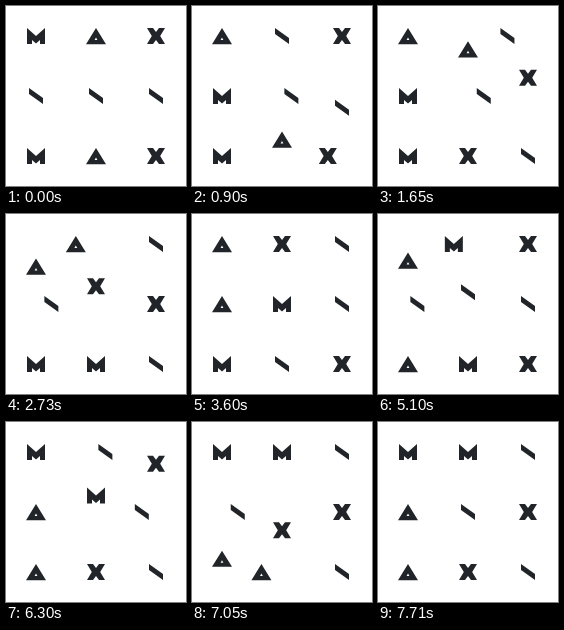
These frames come from a looping animation (180 by 180 pixels, 8000 ms). An HTML page:

```html
<!DOCTYPE html>
<html lang="en">
<head>
<meta charset="utf-8">
<title>Shuffling letters</title>
<style>
  html, body { margin: 0; width: 100%; height: 100%; overflow: hidden; background: #fff; }
  svg { display: block; width: 100%; height: 100%; fill: #212529; fill-rule: evenodd; }
</style>
</head>
<body>
<svg id="stage" viewBox="0 0 180 180"></svg>
<script>
const LOOP = 8000, FRAME = 30;
const FIRST = 150, PERIOD = 600;      // start of the first turn, time between turns
const TURN = 340, LEAD = 47, LAG = 12; // travel time, delay of the first tile, delay per tile
const REVERSE = 7255;                 // from here time runs backwards

const shapes = {
  M: 'M-9-8 0 0 9-8V8H4V4L0 7.5-4 4V8H-9Z',
  A: 'M0-8 10 8.2H-10ZM0 1.5 1.4 4H-1.4Z',
  X: 'M-9-8H-3L0-4 3-8H9L4.2 0 9 8H3L0 4-3 8H-9L-4.2 0Z',
  I: 'M-7-8 7 2V8L-7-2Z'
};
const start = [...'MAXIIIMAX'];

// Cells of a 2x2 block; each tile moves to the cell listed before its own.
const TL = 0, TR = 1, BL = 3, BR = 4;
const ccw = [3, 0, 1, 4], cw = [0, 3, 4, 1];
const cycle = [[TL, ccw], [BR, cw], [TR, cw], [BL, ccw]];
const turns = [...cycle, ...cycle, ...cycle];

const stage = document.getElementById('stage');
const tiles = start.map(letter => {
  const path = document.createElementNS('http://www.w3.org/2000/svg', 'path');
  path.setAttribute('d', shapes[letter]);
  stage.append(path);
  return path;
});

// Constant speed with short ramps at both ends.
function ease(u) {
  const ramp = 0.12;
  if (u <= 0) return 0;
  if (u >= 1) return 1;
  if (u < ramp) return u * u / (2 * ramp * (1 - ramp));
  if (u > 1 - ramp) return 1 - ease(1 - u);
  return (u - ramp / 2) / (1 - ramp);
}

const center = cell => [30 + 60 * (cell % 3), 30 + 60 * Math.floor(cell / 3)];

function draw(time) {
  const t = time > REVERSE ? 2 * REVERSE - time : time;
  const cells = tiles.map((_, i) => i);   // tile held by each cell
  const spots = tiles.map((_, i) => center(i));

  turns.forEach(([corner, ring], k) => {
    const local = t - FIRST - k * PERIOD;
    if (local < 0) return;
    const block = ring.map(c => corner + c);
    const moving = block.map((_, j) => cells[block[(j + 1) % 4]]);
    block.forEach((to, j) => {
      const a = center(block[(j + 1) % 4]), b = center(to);
      const p = ease((local - LEAD - j * LAG) / TURN);
      spots[moving[j]] = [a[0] + (b[0] - a[0]) * p, a[1] + (b[1] - a[1]) * p];
      cells[to] = moving[j];
    });
  });

  tiles.forEach((tile, i) => tile.setAttribute('transform', `translate(${spots[i]})`));
}

function tick() {
  const time = performance.now() % LOOP;
  draw(Math.floor(time / FRAME) * FRAME);
  requestAnimationFrame(tick);
}
tick();
</script>
</body>
</html>
```
